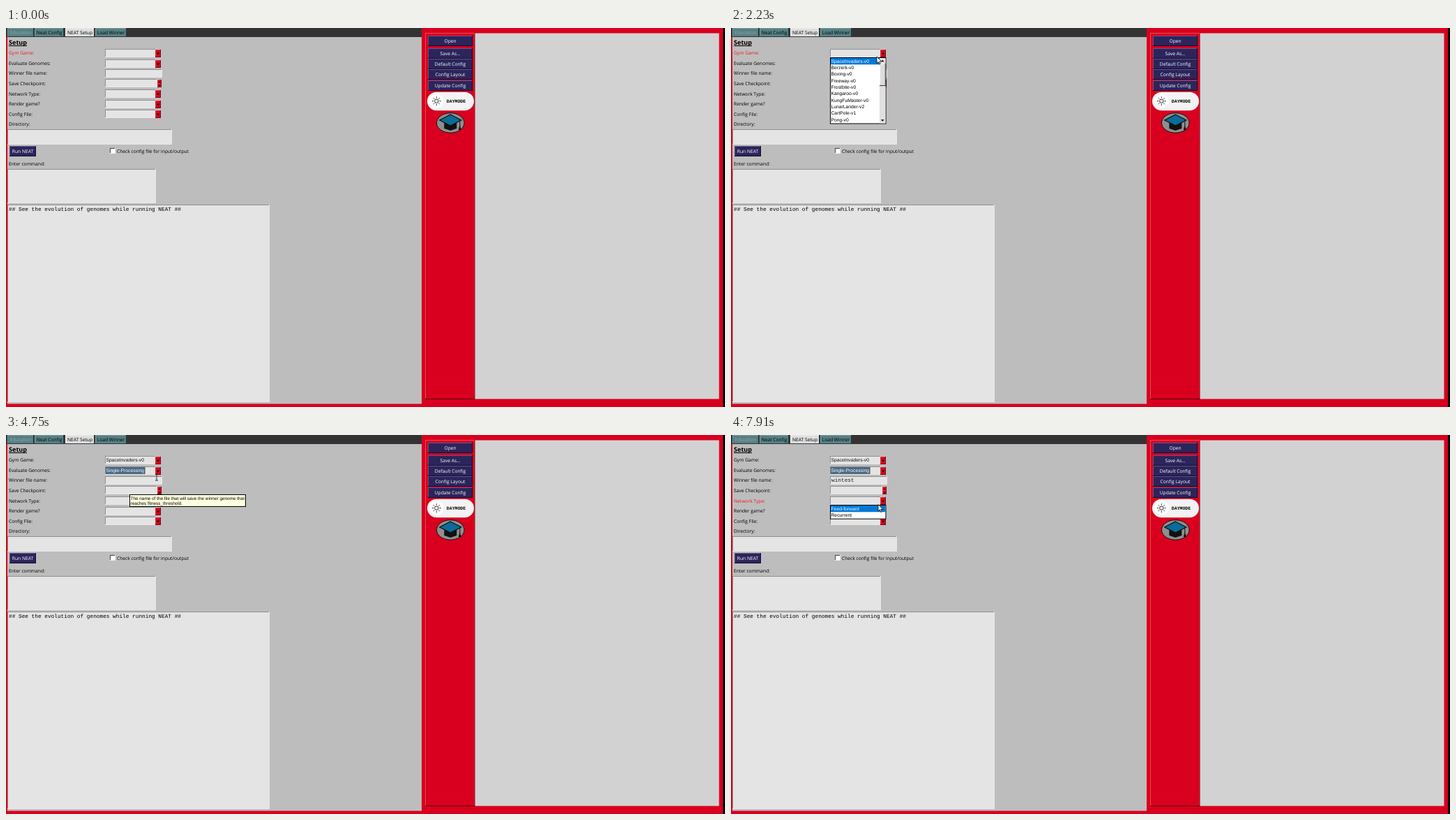
Recreate the animation shown at these times as an HTML page with a canvas. Size 1031 by 543 pixels, loop 7990 ms.

```html
<!DOCTYPE html>
<html lang="en">
<head>
<meta charset="utf-8">
<title>NEAT Setup</title>
<style>
  html, body { margin: 0; width: 100%; height: 100%; overflow: hidden; background: #d8001e; }
  canvas { display: block; }
</style>
</head>
<body>
<canvas id="stage" width="1031" height="543"></canvas>
<script>
const ctx = document.getElementById('stage').getContext('2d');
ctx.textRendering = 'geometricPrecision';

const LOOP = 7990;
const RED = '#d8001e', GREY = '#bdbdbd', FIELD = '#e4e4e4', NAVY = '#2c255c';
const UI = '6.7px "Open Sans", sans-serif';
const LIST = '6.75px "Liberation Sans", sans-serif';
const TIP = '6.4px "Liberation Sans", sans-serif';
const MONO = '7.77px "Liberation Mono", monospace';

const LABELS = ['Gym Game:', 'Evaluate Genomes:', 'Winner file name:', 'Save Checkpoint:',
  'Network Type:', 'Render game?', 'Config File:', 'Directory:'];
const GAMES = ['SpaceInvaders-v0', 'Berzerk-v0', 'Boxing-v0', 'Freeway-v0', 'Frostbite-v0',
  'Kangaroo-v0', 'KungFuMaster-v0', 'LunarLander-v2', 'CartPole-v1', 'Pong-v0'];
const MODES = ['Single-Processing', 'Multi-Processing'];
const NETS = ['Feed-forward', 'Recurrent'];
const EVAL_TIP = ['When single-processing is selected it means it will run only on',
  'one core or one thread of your computer, so one game', '(genome) at a time.'];
const NAME_TIP = ['The name of the file that will save the winner genome that',
  'reaches fitness_threshold.'];

// Clicks, in ms; each shows a halo just before it takes effect
const GYM_OPEN = 1990, GYM_PICK = 2630, EVAL_OPEN = 3260, EVAL_PICK = 3830,
  NAME_CLICK = 4280, NET_OPEN = 7450;
const CLICKS = [GYM_OPEN, GYM_PICK, EVAL_OPEN, EVAL_PICK, NAME_CLICK, NET_OPEN];
const NAME_LEFT = 6450, TYPE_START = 4980, KEY_GAP = 193, BLINK_START = 4150;

// Pointer moves: leave, arrive, x, y
const ENTER = { x: 430, y: 537 };
const MOVES = [
  [70, 1380, 211, 60], [1450, 1900, 217, 37], [GYM_OPEN, 2230, 209, 41],
  [GYM_PICK, 2950, 217, 54], [3340, 3580, 199, 63], [EVAL_PICK, 4130, 200, 70],
  [NAME_CLICK, 4450, 216, 60.5], [6380, 6530, 248, 41], [6770, 7400, 217, 92],
  [7690, 7910, 211, 99.5]];

const between = (t, a, b) => t >= a && t < b;
const rowY = i => 36 + i * 14.55;

function rect(x, y, w, h, color) {
  ctx.fillStyle = color;
  ctx.fillRect(x, y, w, h);
}

function bevel(x, y, w, h, fill, light, dark) {
  rect(x, y, w, h, dark);
  rect(x, y, w - 1, h - 1, light);
  rect(x + 1, y + 1, w - 2, h - 2, fill);
}

function text(str, x, y, font = UI, color = '#000', align = 'left') {
  ctx.font = font;
  ctx.fillStyle = color;
  ctx.textAlign = align;
  ctx.fillText(str, x, y);
  return ctx.measureText(str).width;
}

function poly(pts, fill, stroke, width = 1) {
  ctx.beginPath();
  pts.forEach(([x, y]) => ctx.lineTo(x, y));
  ctx.closePath();
  ctx.fillStyle = fill;
  ctx.fill();
  if (!stroke) return;
  ctx.strokeStyle = stroke;
  ctx.lineWidth = width;
  ctx.stroke();
}

function disc(x, y, rx, ry, fill, stroke) {
  ctx.beginPath();
  ctx.ellipse(x, y, rx, ry, 0, 0, Math.PI * 2);
  ctx.fillStyle = fill;
  ctx.fill();
  if (!stroke) return;
  ctx.strokeStyle = stroke;
  ctx.lineWidth = 1;
  ctx.stroke();
}

// dir 1 points down, -1 points up
function triangle(x, y, dir, r = 2.3) {
  poly([[x - r, y - dir * r / 2], [x + r, y - dir * r / 2], [x, y + dir * r / 2]], '#000');
}

function entry(x, y, w, h) {
  bevel(x, y, w, h, FIELD, '#8f8f8f', '#e9e9e9');
}

function redKey(x, y, w, h, dir, fill = RED) {
  bevel(x, y, w, h, fill, '#e5384a', '#70000f');
  triangle(x + w / 2, y + h / 2 + 0.5, dir, w / 3.5);
}

function button(label, x, y, w, h) {
  bevel(x, y, w, h, NAVY, '#5f5688', '#120d30');
  text(label, x + w / 2, y + h / 2 + 2.4, UI, '#fff', 'center');
}

function combo(row, value, selected, hover) {
  const y = Math.round(rowY(row));
  entry(142, y - 6, 73, 12);
  redKey(214, y - 5, 8, 11, 1, hover ? '#eeebe7' : RED);
  if (!value) return;
  if (selected) {
    ctx.font = LIST;
    const w = ctx.measureText(value).width;
    rect(143, y - 5, w + 1, 10, '#4a6984');
    rect(144 + w, y - 5, 1, 10, '#222');
  }
  text(value, 143.5, y + 2.3, LIST, selected ? '#fff' : '#111');
}

function popup(row, items, scroll) {
  const y = Math.round(rowY(row)) + 6, h = items.length * 9.35 + 2;
  rect(142, y, 80.5, h, '#000');
  rect(143, y + 1, 78.5, h - 2, '#fff');
  rect(143, y + 1, scroll ? 70 : 78.5, 9.3, '#0078d7');
  items.forEach((s, i) => text(s, 143.5, y + 7.6 + i * 9.35, LIST, i ? '#000' : '#fff'));
  if (!scroll) return;
  rect(213, y + 1, 8.5, h - 2, '#e0e0e0');
  bevel(213, y + 9, 8.5, 32, '#dcdcdc', '#fff', '#333');
  triangle(217.3, y + 5, -1);
  triangle(217.3, y + h - 5, 1);
}

function tooltip(y, w, lines) {
  const h = lines.length * 7.5 + 3;
  rect(177, y, w, h, '#000');
  rect(178, y + 1, w - 2, h - 2, '#ffffe0');
  lines.forEach((s, i) => text(s, 178.5, y + 7.9 + i * 7.5, TIP));
}

function tab(label, x, w, mode) {
  const on = mode === 'on';
  bevel(x, 0, w, 13, on ? '#dedede' : '#568083', on ? '#ececec' : '#7d9b9c', '#2b3a3b');
  text(label, x + w / 2, 9.2, UI, mode === 'off' ? '#9aa5a5' : '#000', 'center');
}

function dayButton(x, y) {
  ctx.beginPath();
  ctx.roundRect(604, y - 13, 67, 26.5, 13.2);
  ctx.fillStyle = '#f3f3f3';
  ctx.fill();
  disc(x, y, 10.5, 10.5, '#fff');
  disc(x, y, 2.7, 2.7, '#fff', '#222');
  ctx.beginPath();
  for (let a = 0; a < Math.PI * 2; a += Math.PI / 4) {
    ctx.moveTo(x + Math.cos(a) * 4.3, y + Math.sin(a) * 4.3);
    ctx.lineTo(x + Math.cos(a) * 6.4, y + Math.sin(a) * 6.4);
  }
  ctx.stroke();
  text('DAYMODE', x + 28.2, y + 2.3, 'bold 6.5px "Liberation Mono", monospace', '#000', 'center');
}

function capButton(x, y) {
  disc(x, y, 19.8, 14.2, '#8f8f8f', '#111');
  poly([[x - 9, y], [x + 9, y], [x + 9, y + 8], [x, y + 11], [x - 9, y + 8]], '#111');
  poly([[x, y - 12], [x + 15.5, y - 4], [x, y + 4], [x - 15.5, y - 4]], '#0b6c98', '#111', 1.3);
  rect(x + 13, y - 4, 1, 9, '#111');
  poly([[x + 13.5, y + 3], [x + 15.5, y + 10], [x + 11.5, y + 10]], '#111');
}

function toolbar() {
  rect(596, 0, 432, 543, RED);
  rect(1028, 0, 3, 543, '#000');
  bevel(601, 7, 72, 525, RED, '#ea4a5a', '#50000b');
  rect(672.5, 7.5, 350, 524, '#d2d2d2');
  button('Open', 605, 11, 64, 15);
  ['Save As...', 'Default Config', 'Config Layout', 'Update Config']
    .forEach((s, i) => button(s, 605, Math.round(29 + i * 15.2), 64, 15));
  dayButton(617.3, 104.7);
  capButton(637.3, 136);
}

function background(t) {
  rect(0, 0, 1031, 543, RED);
  rect(0, 0, 596, 13, '#333');
  rect(2, 13, 594, 525.5, GREY);
  tab('Education', 2, 38, 'off');
  tab('Neat Config', 41, 42);
  tab('NEAT Setup', 85, 42, 'on');
  tab('Load Winner', 128, 45);
  text('Setup', 4, 24, 'bold 9.1px "Open Sans", sans-serif');
  rect(4, 25, 26, 1, '#000');

  const active = t < EVAL_OPEN ? 0 : t < EVAL_PICK ? 1 : t >= NET_OPEN ? 4 : -1;
  LABELS.forEach((s, i) => text(s, 4, rowY(i) + 2.3, UI, i === active ? '#f01828' : '#000'));

  entry(2, 145, 236, 22);
  button('Run NEAT', 5, 169, 38, 15);
  bevel(149, 172, 8, 8, '#fff', '#444', '#eee');
  text('Check config file for input/output', 159, 178.8);
  text('Enter command:', 4, 197);
  entry(2, 202, 213, 49);
  entry(2, 253, 376, 283);
  text('## See the evolution of genomes while running NEAT ##', 4, 262, MONO);
  toolbar();
}

function form(t) {
  combo(0, t >= GYM_PICK ? GAMES[0] : '', t < EVAL_PICK, between(t, 1760, GYM_OPEN));
  combo(1, t >= EVAL_PICK ? MODES[0] : '', true, between(t, 2900, EVAL_OPEN));

  entry(142, 59, 82, 12);
  const count = Math.floor((t - TYPE_START) / KEY_GAP) + 1;
  const w = text('wintest'.slice(0, Math.max(0, count)), 144, 67.3, MONO, '#222');
  const blinkOn = (t - BLINK_START) % 900 < 600;
  if (between(t, BLINK_START, NET_OPEN) && blinkOn) rect(144 + Math.round(w), 60, 1, 10, '#000');

  entry(142, 73, 75, 12);
  redKey(217, 74, 6, 6, -1);
  redKey(217, 79, 6, 6, 1);
  [4, 5, 6].forEach(row => combo(row, '', false, row === 4 && between(t, 7330, NET_OPEN)));
}

function overlays(t) {
  if (between(t, GYM_OPEN, GYM_PICK)) popup(0, GAMES, true);
  if (between(t, EVAL_OPEN, EVAL_PICK)) popup(1, MODES);
  if (t >= NET_OPEN) popup(4, NETS);
  if (between(t, 1530, 1760) || between(t, 2800, EVAL_OPEN)) tooltip(70, 174, EVAL_TIP);
  if (between(t, 1380, 1530) || between(t, EVAL_PICK, NAME_LEFT)) tooltip(85, 167, NAME_TIP);
}

function pointerAt(t) {
  let { x, y } = ENTER;
  for (const [leave, arrive, tx, ty] of MOVES) {
    const k = Math.min(1, Math.max(0, (t - leave) / (arrive - leave)));
    const ease = k * k * (3 - 2 * k);
    x += (tx - x) * ease;
    y += (ty - y) * ease;
  }
  return [x, y];
}

function pointer(t) {
  if (t < MOVES[0][0]) return;
  const [x, y] = pointerAt(t);
  if (CLICKS.some(c => between(t, c - 80, c))) disc(x - 0.5, y - 0.5, 7.2, 7.2, 'rgba(240,210,35,.75)');

  if (between(t, 1330, 1530) || between(t, EVAL_PICK, NAME_LEFT)) {
    rect(x - 0.5, y - 4.5, 1, 9, '#333');
    rect(x - 2, y - 5, 4, 1, '#333');
    rect(x - 2, y + 4, 4, 1, '#333');
    return;
  }
  const arrow = [[0, 0], [0, 9.5], [2.2, 7.5], [3.8, 11], [5.3, 10.3], [3.8, 7], [6.8, 6.8]];
  poly(arrow.map(([dx, dy]) => [x + dx, y + dy]), '#fff', '#000', 0.8);
}

const start = performance.now();
function tick() {
  const t = (performance.now() - start) % LOOP;
  background(t);
  form(t);
  overlays(t);
  pointer(t);
  requestAnimationFrame(tick);
}
tick();
</script>
</body>
</html>
```
